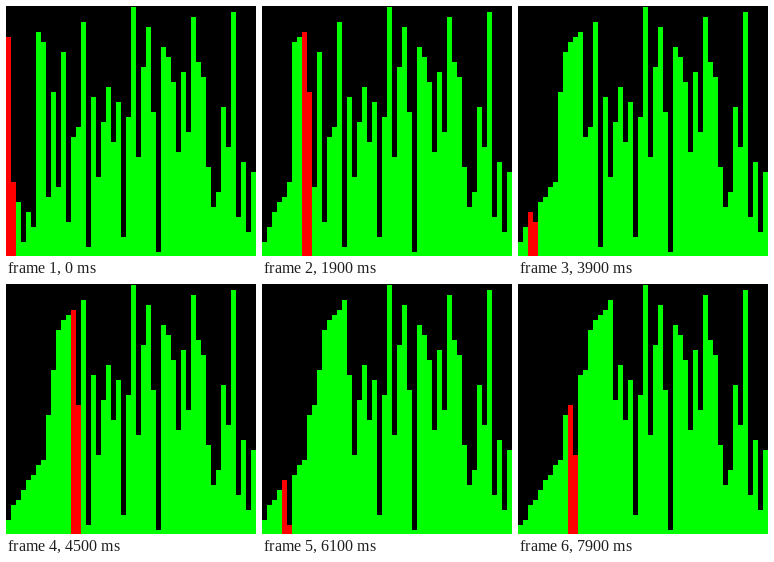
Recreate the animation shown at these times as a matplotlib script. Size 250 by 250 pixels, loop 8 s.

```python
import matplotlib.pyplot as plt
from matplotlib.animation import FuncAnimation

SIZE, BAR, FRAMES, INTERVAL = 250, 5, 80, 100
GREEN, RED = "#00ff00", "#ff0000"

START = [44, 15, 11, 3, 9, 6, 45, 43, 12, 33, 14, 41, 7, 24, 26, 47, 2,
         32, 16, 27, 34, 23, 31, 4, 28, 50, 20, 38, 46, 29, 1, 42, 40, 35,
         21, 37, 25, 48, 39, 36, 18, 10, 13, 30, 22, 49, 8, 19, 5, 17]


def insertion_steps(values):
    """Yield (array, left index) just before every swap of an insertion sort."""
    a = list(values)
    for i in range(1, len(a)):
        j = i
        while j > 0 and a[j - 1] > a[j]:
            yield a[:], j - 1
            a[j - 1], a[j] = a[j], a[j - 1]
            j -= 1


steps = [step for step, _ in zip(insertion_steps(START), range(FRAMES))]

fig = plt.figure(figsize=(SIZE / 100, SIZE / 100), dpi=100, facecolor="black")
ax = fig.add_axes([0, 0, 1, 1])
ax.set_xlim(0, SIZE)
ax.set_ylim(0, SIZE)
ax.axis("off")
bars = ax.bar([i * BAR for i in range(len(START))], START, width=BAR,
              align="edge", linewidth=0, snap=True)
ax.set_xlim(0, SIZE)
ax.set_ylim(0, SIZE)


def draw(frame):
    values, left = steps[frame]
    for i, (bar, value) in enumerate(zip(bars, values)):
        bar.set_height(value * BAR - 1)
        bar.set_facecolor(RED if i in (left, left + 1) else GREEN)
    return list(bars)


anim = FuncAnimation(fig, draw, frames=FRAMES, interval=INTERVAL,
                     repeat=True, repeat_delay=0, blit=False)
plt.show()
```
